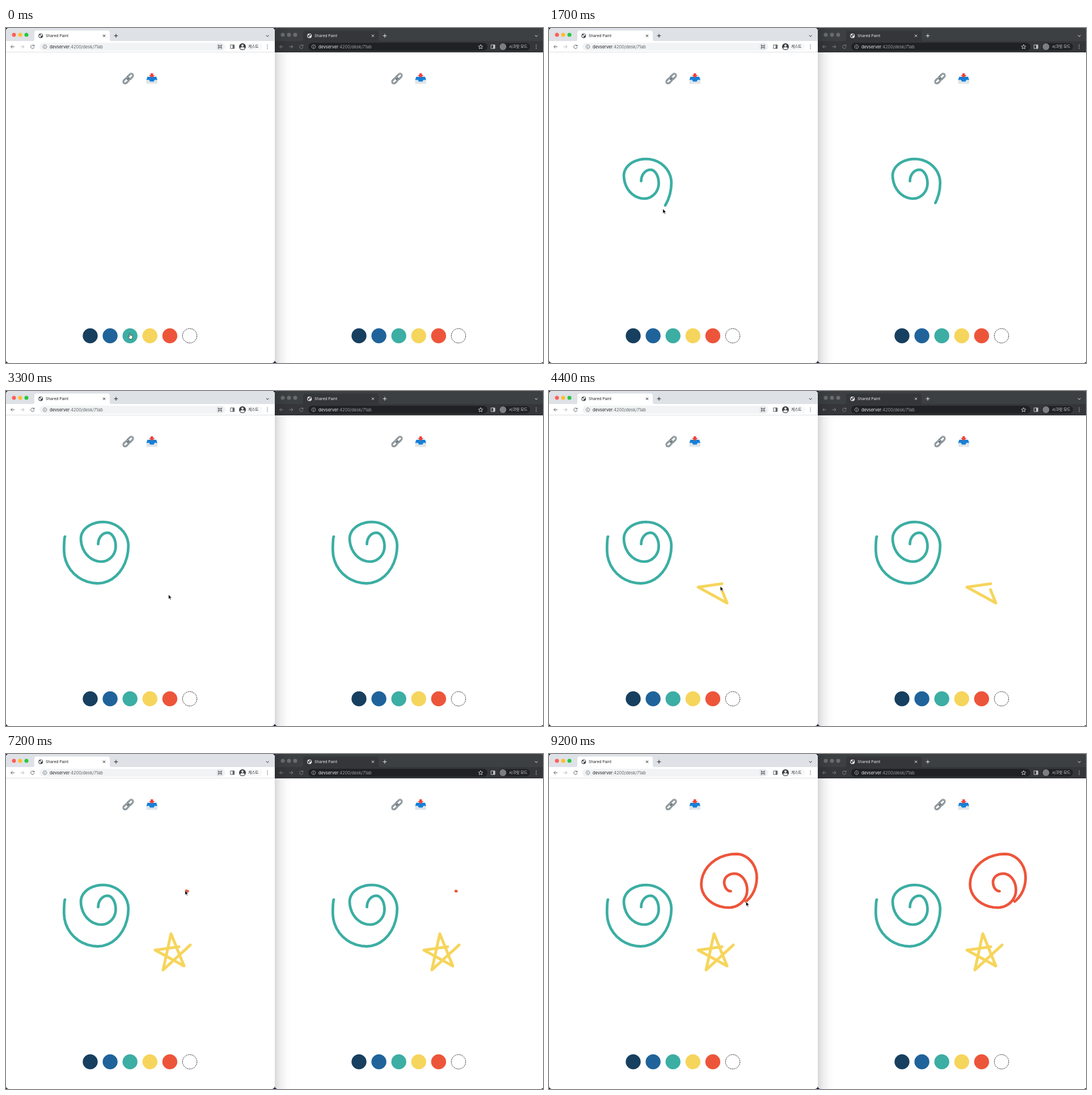
These frames come from a looping animation (947 px wide and 591 px high, 9530 ms). An HTML page:

```html
<!DOCTYPE html>
<html lang="ko">
<head>
<meta charset="utf-8">
<title>Shared Paint</title>
<style>
  html, body { margin: 0; height: 100%; overflow: hidden; background: #131a33; }
  svg { display: block; width: 100vw; height: 100vh; }
  text { font: 6.7px Inter, "Noto Sans CJK KR", "Noto Sans CJK", sans-serif; }
  .url { font-size: 7.4px; }
  .line { fill: none; stroke-width: 1; }
  .thin { stroke-width: .8; }
  .ink { fill: none; stroke-linecap: round; stroke-linejoin: round; }
</style>
</head>
<body>
<svg id="stage" viewBox="0 0 947 591"></svg>
<script>
const LOOP = 9530, STEP = 100, LAST = 9200, PANE = 474, SWATCH_Y = 543;
const COLORS = ['#173f5f', '#20639b', '#3caea3', '#f6d55c', '#ed553b'];
const LIGHT = { strip: '#dee1e6', bar: '#fff', field: '#f1f3f4', chip: '#f7f8f9', fg: '#202124',
  icon: '#5f6368', off: '#babcbe', nav: '#5f6368', path: '#5f6368', edge: '#dadce0' };
const DARK = { strip: '#3c4043', bar: '#35363a', field: '#202124', chip: '#202124', fg: '#e8eaed',
  icon: '#c4c7ca', off: '#808387', nav: '#808387', path: '#9aa0a6', edge: '#2b2c2f' };

const swatchX = i => 148.5 + 35.1 * i;
const pairs = s => s.split(' ').map(p => p.split(',').map(Number));

// Leg of a spiral between two of its outermost points: a quarter ellipse.
const quarter = (a, b, k, flip) => {
  const sin = Math.sin(k * Math.PI / 2), versin = 1 - Math.cos(k * Math.PI / 2);
  const [kx, ky] = flip ? [sin, versin] : [versin, sin];
  return [a[0] + (b[0] - a[0]) * kx, a[1] + (b[1] - a[1]) * ky];
};
const straight = (a, b, k) => a.map((v, j) => v + (b[j] - v) * k);

// A stroke runs through its keys; bend > 0 slows the hand towards the end.
// pick: time on the swatch, rest: where the pointer waits afterwards.
const strokes = [
  { swatch: 2, width: 4.7, leg: quarter, odd: 0, start: 437, end: 2210, bend: 0, legs: 9,
    keys: pairs('162.5,270 179,250 193.5,274 168,301 132,260 171,231 215.8,273 162,339.3 102.3,281 104,257'),
    pick: [0, 0], rest: { from: 2400, at: 3000, until: 3300, pos: [286.5, 359] } },
  { swatch: 3, width: 5, leg: straight, start: 3900, end: 5200, bend: 0.45, legs: 5,
    keys: pairs('305,340 263,346 314,374 291,317 277,381 325,337'),
    pick: [3600, 3700], rest: { from: 5400, at: 5600, until: 5750, pos: [284, 484] } },
  { swatch: 4, width: 4.7, leg: quarter, odd: 1, start: 7180, end: 8600, bend: 0.45, legs: 7.64,
    keys: pairs('320.5,242 309,226 327,211 349.5,240 317,271 268.5,230 330,176.3 366.5,218 325,268'),
    pick: [6100, 6500] }
];

function progress(s, t) {
  const k = Math.min(1, Math.max(0, (t - s.start) / (s.end - s.start)));
  return s.legs * k * (1 + s.bend * (1 - k));
}

function pointAt(s, u) {
  const i = Math.min(Math.floor(u), s.keys.length - 2);
  return s.leg(s.keys[i], s.keys[i + 1], u - i, (i + s.odd) % 2);
}

// Pointer stops: swatch, start of the stroke, its end, then the resting place.
const stops = strokes.flatMap(s => {
  const swatch = [swatchX(s.swatch), SWATCH_Y - 3], last = pointAt(s, s.legs), r = s.rest;
  return [...s.pick.map(t => ({ t, pos: swatch })),
    { t: s.start - 100, pos: pointAt(s, 0) }, { t: s.start, pos: pointAt(s, 0) }, { t: s.end, pos: last },
    ...(r ? [{ t: r.from, pos: last }, { t: r.at, pos: r.pos }, { t: r.until, pos: r.pos }] : [])];
});

function pointer(t) {
  const s = strokes.find(s => t > s.start && t < s.end);
  if (s) return pointAt(s, progress(s, t + 15)); // runs slightly ahead of the ink
  const i = stops.findIndex(p => p.t > t);
  if (i < 0) return stops[stops.length - 1].pos;
  const a = stops[i - 1], b = stops[i], k = (t - a.t) / (b.t - a.t);
  return straight(a.pos, b.pos, k * k * (3 - 2 * k));
}

const circle = (x, y, r, fill) => `<circle cx="${x}" cy="${y}" r="${r}" fill="${fill}"/>`;
const box = (x, y, w, h, r, fill) => `<rect x="${x}" y="${y}" width="${w}" height="${h}" rx="${r}" fill="${fill}"/>`;
const line = (d, color, cls = '') => `<path class="line ${cls}" d="${d}" stroke="${color}"/>`;
const fill = (d, color) => `<path d="${d}" fill="${color}"/>`;

function emoji() {
  const ring = (x, y) => [['#37444b', 2.6], ['#cfd8dc', 1.1]].map(([color, w]) =>
    `<rect x="-6" y="-3.2" width="12" height="6.4" rx="3.2" fill="none" stroke="${color}" stroke-width="${w}"
      transform="translate(${x} ${y}) rotate(-45)"/>`).join('');
  return ring(219, 85.8) + ring(212, 92.8) + line('M213.3 91.5l4.4-4.4', '#37444b') +
    box(247.5, 90.5, 19.5, 8, 1, '#dfe5e9') +
    fill('M249.5 86h15.5l2 5.5h-5l-1.5 3h-6.5l-1.5-3h-5z', '#1580d8') +
    fill('M255 80h4.500v3h3l-5.3 5-5.2-5h3z', '#f0413c');
}

function tabs(c, dark) {
  const lights = dark ? Array(3).fill('#696c70') : ['#ff5f57', '#febc2e', '#28c840'];
  return box(0, 0, PANE, 43, 0, c.strip) +
    lights.map((f, i) => circle(14 + 11 * i, 12, 3.5, f)).join('') +
    fill('M46 23.5q4 0 4-4v-11q0-4 4-4h125q4 0 4 4v11q0 4 4 4z', c.bar) +
    circle(61.2, 13.8, 4, dark ? '#f1f3f4' : '#45494d') +
    fill('M58 12.3l2.5 1 1 1.5-1.2 2.3q-2.3-1.5-2.3-4.8zM61.5 10.5l2.5 1-.5 2-2 .3-1-1.5z', c.bar) +
    `<text x="70" y="16.1" fill="${c.fg}">Shared Paint</text>` +
    line('M171 11.7l4 4m0-4l-4 4', c.fg) +
    line('M190.7 13.7h6.6m-3.3-3.3v6.6', c.fg) +
    line('M458.8 12.8l2.4 2.3 2.4-2.3', c.fg);
}

function toolbar(c, dark) {
  const fieldEnd = dark ? 375 : 387, panel = dark ? 384.5 : 399;
  return box(0, 23, PANE, 19.5, 0, c.bar) + box(0, 42, PANE, 0.8, 0, c.edge) +
    line('M15 33h-6.5m3-3l-3 3 3 3', c.nav) +
    line('M25.5 33h6.5m-3-3l3 3-3 3', c.off) +
    line('M49.3 31.3a3.1 3.1 0 1 0 .5 2.5m.1-4.3v2.3h-2.3', c.nav) +
    box(59, 26, fieldEnd - 59, 14, 7, c.field) +
    line('M65.2 33a3.3 3.3 0 1 1 0 .01M68.5 32.5v2.3m0-3.9v.8', c.icon, 'thin') +
    `<text class="url" x="77" y="35.5" fill="${c.path}"><tspan fill="${c.fg}">devserver</tspan>:4200/desk/71ab</text>` +
    line(`M${panel - 3.2} 29.8h6.8v6.4h-6.8z`, c.icon) +
    box(panel + 0.6, 30, 3, 6, 0, c.icon) +
    [30, 33, 36].map(y => circle(461, y, 0.8, c.icon)).join('');
}

const guest = c => box(371.5, 27.5, 11, 11, 2, '#e3e5e8') +
  line('M373.8 30h1.5v6h-1.5m6.9-6h-1.5v6h1.5m-6.9-4.5h6.9m-6.9 3h6.9', '#4a4e52', 'thin') +
  box(410, 26.5, 42, 13, 6.5, c.chip) + circle(417, 33, 6, '#3c4043') +
  circle(417, 31, 1.9, '#fff') + fill('M413 36.2q0-2.5 4-2.5t4 2.5q-4 3.2-8 0z', '#fff') +
  `<text x="427" y="35.4" fill="${c.fg}" font-weight="500">게스트</text>`;

const secret = c => line('M363 29.3l1.1 2.5 2.7.3-2 1.8.6 2.7-2.4-1.4-2.4 1.4.6-2.7-2-1.8 2.7-.3z', c.fg, 'thin') +
  box(395, 26.5, 55, 13, 6.5, c.chip) + circle(402.3, 33, 6, '#7b7f84') +
  `<text x="413" y="35.4" fill="${c.fg}">시크릿 모드</text>`;

const palette = () => COLORS.map((f, i) => circle(swatchX(i), SWATCH_Y, 13.2, f)).join('') +
  `<circle class="line" cx="${swatchX(5)}" cy="${SWATCH_Y}" r="12.7" stroke="#111" stroke-dasharray="2 1.3"/>`;

function pane(id, dark) {
  const c = dark ? DARK : LIGHT;
  return `<g transform="translate(${dark ? PANE : 0})" clip-path="url(#win)">` +
    box(0, 0, PANE, 591, 0, '#fff') + tabs(c, dark) + toolbar(c, dark) + (dark ? secret : guest)(c) +
    emoji() + palette() + (dark ? box(0, 0, 30, 591, 0, 'url(#shade)') : '') +
    strokes.map((s, i) => `<polyline class="ink" id="${id}${i}" stroke="${COLORS[s.swatch]}" stroke-width="${s.width}"/>`).join('') +
    '</g>';
}

const el = id => document.getElementById(id);
el('stage').innerHTML = `<defs>
  <clipPath id="win"><rect width="${PANE}" height="591" rx="5"/></clipPath>
  <linearGradient id="shade"><stop stop-opacity=".15"/><stop offset=".35" stop-opacity=".06"/>
    <stop offset=".7" stop-opacity=".015"/><stop offset="1" stop-opacity="0"/></linearGradient></defs>` +
  pane('a', false) + pane('b', true) +
  `<g id="pointer" stroke="#fff" stroke-width=".7" stroke-linejoin="round">
    <path id="arrow" d="M0 0v8.2l1.9-1.7 1.4 3 1.3-.6-1.3-2.9h2.5z"/>
    <path id="hand" fill="#fff" stroke="#222" d="M-1.3 5V-.6q0-1 .8-1t.8 1V2.2q.8-.7 1.5.2.8-.5 1.4.4 1.2-.3 1.2 1v1.7q0 1.5-.9 2.7v.8h-4.3q-.3-1.6-1.7-2.9l-1.2-1.8q.8-1.2 2.4.7z"/>
  </g>`;

function drawStroke(id, s, t) {
  const u = progress(s, t), pts = [];
  for (let v = 0; v < u; v += 0.1) pts.push(pointAt(s, v));
  // Corners sit on whole numbers, so steps of a tenth keep them sharp.
  if (t >= s.start) pts.push(pointAt(s, u));
  el(id).setAttribute('points', pts.join(' '));
}

function render(t) {
  strokes.forEach((s, i) => {
    drawStroke('a' + i, s, t);
    drawStroke('b' + i, s, t - 10);
  });
  const [x, y] = pointer(t), hover = Math.abs(y - SWATCH_Y) < 13;
  el('pointer').setAttribute('transform', `translate(${x} ${y})`);
  el('arrow').style.display = hover ? 'none' : '';
  el('hand').style.display = hover ? '' : 'none';
}

const begin = performance.now();
function tick() {
  const t = (performance.now() - begin) % LOOP;
  render(Math.min(LAST, Math.floor(t / STEP) * STEP));
  requestAnimationFrame(tick);
}
tick();
</script>
</body>
</html>
```
